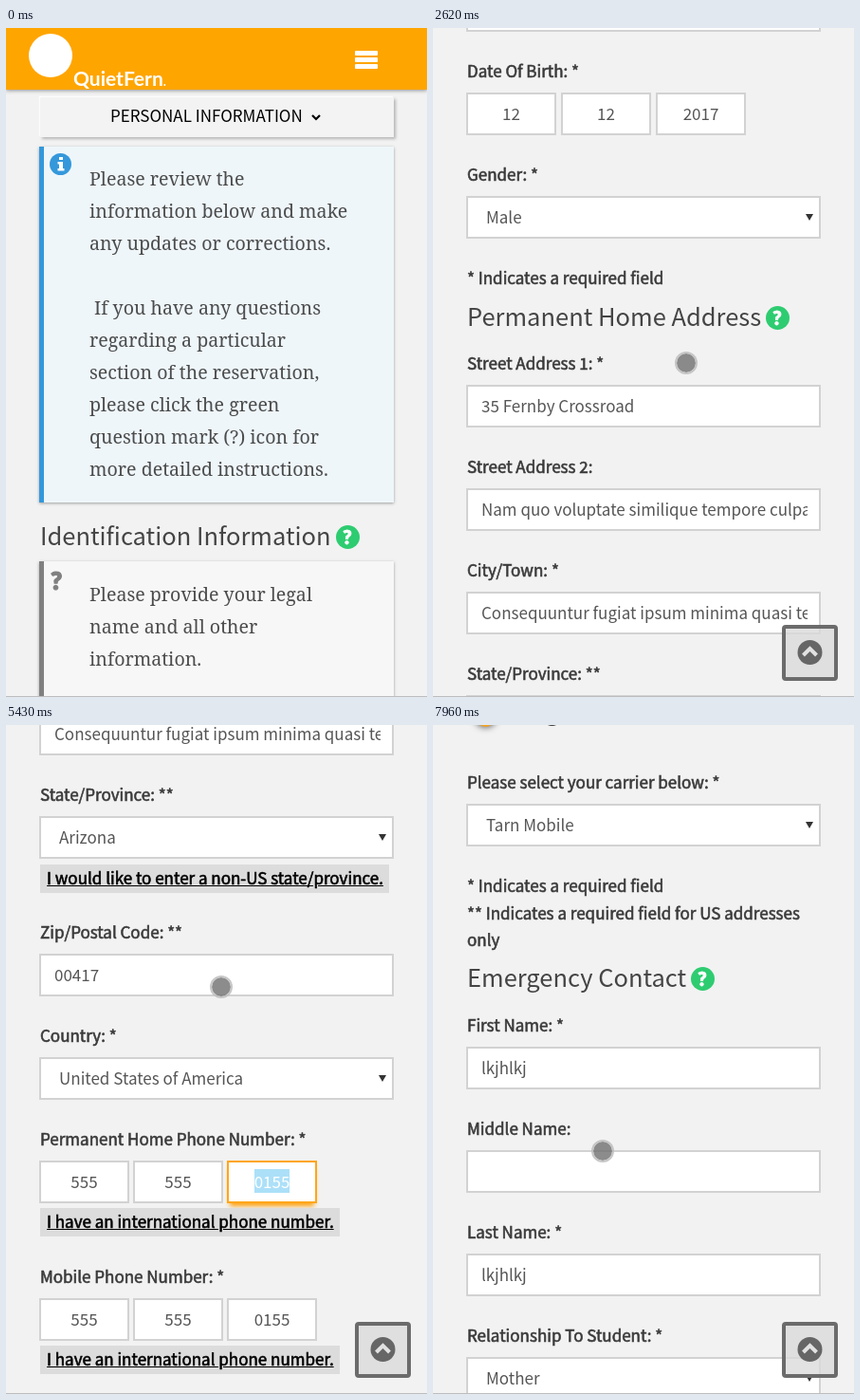
An HTML page for the animation above (8000 ms loop, 444 px wide and 705 px high).

```html
<!DOCTYPE html>
<html lang="en">
<head>
<meta charset="utf-8">
<title>Mobile form</title>
<style>
html, body { margin: 0; width: 100%; height: 100%; overflow: hidden; }
body { background: #f2f2f2; }
#stage {
  position: absolute; inset: 0; overflow: hidden;
  font: 17px 'Noto Sans CJK JP', 'Noto Sans CJK SC', 'Noto Sans CJK', 'Open Sans', sans-serif;
  color: #3a3a3a;
}
#page { position: absolute; left: 0; top: 0; width: 444px; }
#page > *, #stage > * { position: absolute; box-sizing: border-box; white-space: pre; }

.header { width: 444px; height: 65px; background: #ffa500; box-shadow: 0 1px 4px rgba(0,0,0,.4); }
.logo { width: 46px; height: 46px; border-radius: 50%; background: #fff; }
.brand { font: 700 21px/28px Lato, sans-serif; color: #fff; }
.brand small { font-size: 13px; }
.bar { width: 24px; height: 5px; border-radius: 1px; background: #fff; }
.menu {
  width: 373px; height: 42px; background: #f3f3f3; line-height: 38px; color: #000; padding-left: 74px;
  box-shadow: 2px 2px 3px rgba(0,0,0,.25), -1px -1px 1px #fff;
}

.note { width: 374px; border-left: 5px solid #808080; background: #f7f7f7; box-shadow: 0 1px 3px rgba(0,0,0,.35); }
.note.info { border-color: #3498db; background: #eef6fa; }
.para { font: 19.6px/34px 'Noto Serif', serif; color: #4c4c4c; }
.badge {
  width: 25px; height: 25px; border-radius: 50%; background: #2ecc71; color: #fff;
  font: 900 20px/25px Lato, sans-serif; text-align: center; -webkit-text-stroke: .8px;
}
.badge.blue { width: 23px; height: 23px; background: #3498db; }
.ask { font: 900 26px/28px Lato, sans-serif; color: #808080; -webkit-text-stroke: 1.2px; }

.heading { font-size: 25.5px; line-height: 38px; color: #444; }
.label { line-height: 28px; -webkit-text-stroke: .6px; }
.plain { line-height: 28px; color: #484848; }
.field {
  height: 45px; border: 2px solid; padding: 0 12px 0 14px; background: #fff; color: #555; line-height: 39px;
  border-color: color-mix(in srgb, #ffa61a calc(var(--k, 0) * 100%), #d2d2d2);
  box-shadow: 0 6px 5px -3px rgb(255 160 10 / var(--k, 0));
}
.field span { display: block; height: 41px; overflow: hidden; }
.field i { font-style: normal; }
.field.on i { background: #ace0f8; color: #fff; }
.field.mid { padding: 0; text-align: center; }
.field.select { padding-left: 19px; }
.select.on i { background: none; color: inherit; }
.select::after {
  content: ''; position: absolute; right: 6px; top: 17px;
  border: solid transparent; border-width: 7px 4px 0; border-top-color: #333;
}
.link {
  height: 30px; padding: 0 7px; background: #dcdcdc; color: #000; line-height: 28px;
  text-decoration: underline; -webkit-text-stroke: .6px;
}
.link.on { outline: 1px solid #6b9ee0; }
.radio { width: 21px; height: 21px; border-radius: 50%; border: 3px solid #3c3c3c; background: #fafafa; }
.radio.checked {
  width: 23px; height: 23px; border: 1px solid #e0a040; background: #fba30f;
  box-shadow: 0 0 calc(2px + 4px * var(--k, 0)) 1px rgb(70 70 70 / calc(.25 + .5 * var(--k, 0)));
}

#top {
  left: 368px; top: 629px; width: 59px; height: 59px; border: 4px solid #6b6b6b; border-radius: 4px;
  background: rgba(218,218,218,.78);
}
#top svg { display: block; }
#foot { left: 0; top: 704px; width: 444px; height: 1px; background: #bdbdbd; }
#touch {
  left: -12px; top: -12px; width: 24px; height: 24px; border-radius: 50%;
  background: rgba(112,112,112,.8); border: 2px solid rgba(190,190,190,.85); background-clip: padding-box;
}
</style>
</head>
<body>
<div id="stage">
  <div id="page"></div>
  <div id="top"><svg width="51" height="51" viewBox="0 0 51 51"><circle cx="25.5" cy="25" r="13" fill="#666"/><path d="M18.5 28l7-7 7 7" fill="none" stroke="#e2e2e2" stroke-width="4"/></svg></div>
  <div id="foot"></div>
  <div id="touch"></div>
</div>
<script>
const $ = id => document.getElementById(id);
const page = $('page'), topBtn = $('top'), touch = $('touch');
const LOOP = 8000;

// Scroll offsets where the page comes to rest
const HOME = 1187, PHONE = 1794, CARRIER = 2212, CONTACT = 2627;

function put(cls, x, y, html = '', css = '') {
  const el = document.createElement('div');
  el.className = cls;
  el.style.cssText = `left:${x}px;top:${y}px;${css}`;
  el.innerHTML = html;
  page.append(el);
  return el;
}
// y is the middle of the text line
const label = (y, text) => put('label', 36, y - 15, text);
const box = (x, y, w, text, cls = '') =>
  put('field ' + cls, x, y + 22, `<span><i>${text}</i></span>`, `width:${w}px`);
const input = (y, name, text) => (label(y, name), box(35, y, 374, text));
const select = (y, name, text) => (label(y, name), box(35, y, 374, text, 'select'));
const trio = (y, name, xs, texts) => (label(y, name), xs.map((x, i) => box(x, y, 95, texts[i], 'mid')));
const link = (y, w, text) => put('link', 36, y, text, `width:${w}px`);
const para = (y, lines) => put('para', 88, y - 17, lines.join('\n'));
function heading(y, text, badgeX) {
  put('heading', 36, y - 21, text);
  put('badge', badgeX - 12.5, y - 12.5, '?');
}

// Top of the page
put('header', 0, 0);
put('logo', 24, 6);
put('brand', 71, 39, 'QuietFern<small>.</small>');
[24, 31, 38].forEach(y => put('bar', 368, y));
put('menu', 36, 73, 'PERSONAL INFORMATION');
put('', 321, 89, '<svg width="12" height="10" style="display:block"><path d="M2 3l4 4 4-4" fill="none" stroke="#000" stroke-width="2.2"/></svg>');

put('note info', 35, 125, '', 'height:375px');
put('badge blue', 46, 132,
  '<svg width="23" height="23" style="display:block" fill="#fff"><path d="M10 4h4v3h-4zM8.5 9H14v7h1.5v2.5h-7V16H10v-4.5H8.5z"/></svg>');
para(159, ['Please review the', 'information below and make', 'any updates or corrections.']);
para(295, [' If you have any questions', 'regarding a particular', 'section of the reservation,',
  'please click the green', 'question mark (?) icon for', 'more detailed instructions.']);

heading(536, 'Identification Information', 360);
put('note', 35, 562, '', 'height:308px');
put('ask', 47, 568, '?');
para(597, ['Please provide your legal', 'name and all other', 'information.', '',
  "If you're an international", 'student, please enter your', 'name as it appears on', 'your passport.']);
input(906, 'First Name: *', 'lkjhlkj');
input(1015, 'Middle Name:', '');
input(1124, 'Last Name: *', 'lkjhlkj');

// Birth date and home address
trio(HOME + 46, 'Date Of Birth: *', [35, 135, 235], ['12', '12', '2017']);
select(HOME + 155, 'Gender: *', 'Male');
label(HOME + 264, '* Indicates a required field');
heading(HOME + 305, 'Permanent Home Address', 363);
input(HOME + 354, 'Street Address 1: *', '35 Fernby Crossroad');
input(HOME + 463, 'Street Address 2:', 'Nam quo voluptate similique tempore culpa a mod');
input(HOME + 572, 'City/Town: *', 'Consequuntur fugiat ipsum minima quasi tempora');

// State, country and phones
const phoneX = [35, 134, 233], phone = ['555', '555', '0155'];
const abroad = 'I have an international phone number.';
select(PHONE + 74, 'State/Province: **', 'Arizona');
link(PHONE + 147, 368, 'I would like to enter a non-US state/province.');
const zip = input(PHONE + 219, 'Zip/Postal Code: **', '00417');
const country = select(PHONE + 328, 'Country: *', 'United States of America');
const home = trio(PHONE + 437, 'Permanent Home Phone Number: *', phoneX, phone);
const homeLink = link(PHONE + 509, 316, abroad);
const mobile = trio(PHONE + 582, 'Mobile Phone Number: *', phoneX, phone);
const mobileLink = link(PHONE + 654, 316, abroad);

// Text messages and carrier
label(CARRIER + 308, 'Would you like to receive text message');
label(CARRIER + 337, 'reminders/announcements regarding');
label(CARRIER + 365, 'orientation? *');
const yes = put('radio checked', 43.5, CARRIER + 393.5);
put('plain', 77, CARRIER + 390, 'Yes');
put('radio', 115, CARRIER + 394.5);
put('plain', 148, CARRIER + 390, 'No');
select(CARRIER + 476, 'Please select your carrier below: *', 'Tarn Mobile');
label(CARRIER + 585, '* Indicates a required field');
label(CARRIER + 614, '** Indicates a required field for US addresses');
label(CARRIER + 642, 'only');

// Emergency contact
heading(CONTACT + 267, 'Emergency Contact', 284);
input(CONTACT + 317, 'First Name: *', 'lkjhlkj');
input(CONTACT + 426, 'Middle Name:', '');
input(CONTACT + 535, 'Last Name: *', 'lkjhlkj');
select(CONTACT + 644, 'Relationship To Student: *', 'Mother');

// Keyboard focus: start time and element
const focus = [
  [3550, zip], [4030, country], [4400, home[0]], [5020, home[1]], [5240, home[2]],
  [5470, homeLink], [5650, mobile[0]], [6040, mobile[1]], [6350, mobile[2]],
  [6520, mobileLink], [6680, yes]
];

// Motion is held between beats: first, last, count
const beats = [0];
[[210, 1010, 11], [1080, 1560, 7], [1790, 2080, 5], [2160, 2560, 6], [2620, 3250, 9],
 [6680, 6680, 1], [7140, 7510, 6], [7600, 7820, 4], [7960, 7960, 1]].forEach(([a, b, n]) => {
  for (let i = 0; i < n; i++) beats.push(n > 1 ? Math.round(a + (b - a) * i / (n - 1)) : a);
});
const snap = t => beats.findLast(b => b <= t);

const scrollKeys = [
  [0, 0], [1720, 0], [2008, 40], [2080, 69], [2240, 330], [2560, 1090], [2620, HOME],
  [2860, 1560], [3100, 1755], [3250, PHONE], [6679, PHONE], [6680, CARRIER],
  [7510, CARRIER], [7820, CARRIER + 350], [7960, CONTACT]
];
const touchKeys = [
  [210, 370, 675], [450, 290, 470], [770, 200, 238], [1010, 132, 330], [1240, 109, 422],
  [1400, 200, 350], [1560, 253, 303], [1720, 253, 303], [2080, 237, 320], [2620, 267, 353],
  [3250, 227, 276], [7065, 227, 276], [7510, 186, 440], [7960, 179, 449]
];

const clamp = v => Math.min(1, Math.max(0, v));
function track(keys, t) {
  const i = keys.findLastIndex(k => k[0] <= t);
  const a = keys[Math.max(i, 0)], b = keys[i + 1] || a;
  const k = b === a ? 0 : clamp((t - a[0]) / (b[0] - a[0]));
  return a.slice(1).map((v, n) => v + (b[n + 1] - v) * k);
}

function draw() {
  const t = performance.now() % LOOP, s = snap(t);
  const [y] = track(scrollKeys, s), [cx, cy] = track(touchKeys, s);
  page.style.transform = `translateY(${-Math.round(y)}px)`;
  touch.style.transform = `translate(${Math.round(cx)}px, ${Math.round(cy)}px)`;
  touch.style.visibility = t < 210 ? 'hidden' : 'visible';
  topBtn.style.opacity = clamp((s - 2160) / 400);

  focus.forEach(([start, el], i) => {
    const end = i + 1 < focus.length ? focus[i + 1][0] : LOOP + 200;
    const fade = from => t < from ? 0 : clamp((t - from + 70) / 140);
    el.style.setProperty('--k', (fade(start) - fade(end)).toFixed(3));
    el.classList.toggle('on', el !== zip && t >= start && t < end);
  });
  requestAnimationFrame(draw);
}
draw();
</script>
</body>
</html>
```
